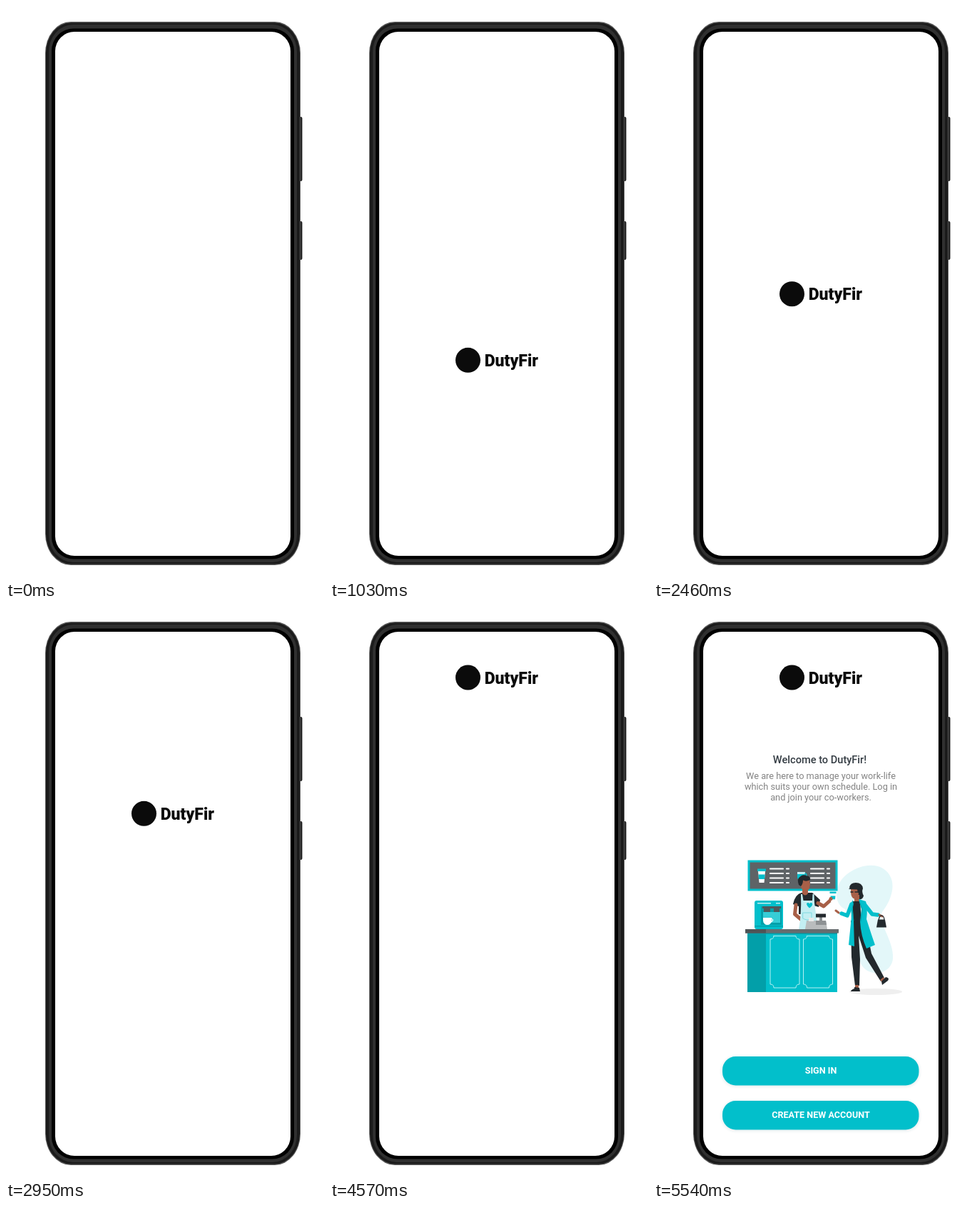
These frames come from a looping animation (446x800 px, 7.74 s). An HTML page:

```html
<!DOCTYPE html>
<html lang="en">
<head>
<meta charset="utf-8">
<title>Phone onboarding</title>
<style>
  html, body { margin: 0; width: 100%; height: 100%; overflow: hidden; background: #fff; }
  svg { display: block; width: 100%; height: 100%; }
  text { font-family: Roboto, Arial, sans-serif; text-anchor: middle; }

  .logo { animation: rise 7740ms infinite; }
  .welcome { animation: appear 7740ms infinite; }

  /* 0 to 1660 ms up to the middle, 2460 to 4460 ms up to the top */
  @keyframes rise {
    0% { transform: translateY(784.5px); animation-timing-function: cubic-bezier(.245, .403, .665, 1); }
    21.447% { transform: translateY(303px); animation-timing-function: linear; }
    31.783% { transform: translateY(303px); animation-timing-function: ease-out; }
    57.623%, 100% { transform: translateY(0); }
  }
  /* 4600 to 5600 ms */
  @keyframes appear {
    0%, 59.432% { opacity: 0; animation-timing-function: ease-out; }
    72.351%, 100% { opacity: 1; }
  }

  .brand { font-size: 23px; font-weight: 900; text-anchor: end; fill: #0b0b0b; }
  .title { font-size: 14.6px; font-weight: 500; fill: #343c43; }
  .body { font-size: 12.75px; fill: #828282; }
  .button rect { fill: #00bfcb; filter: drop-shadow(0 1px 2.5px #0a5a6426); }
  .button text { font-size: 12.6px; font-weight: 700; fill: #fff; }

  .teal { fill: #00bfcb; }
  .deep { fill: #009fa9; }
  .ink { fill: #22282c; }
  .skin { fill: #a85f47; }
  .pale { fill: #c3eef2; }
  .line { fill: none; stroke-linecap: round; stroke-linejoin: round; }
</style>
</head>
<body>
<svg viewBox="0 0 446 800">
  <defs>
    <clipPath id="screen"><rect x="69" y="36" width="330" height="733" rx="27"/></clipPath>
    <path id="menu" class="line" stroke="#fff" stroke-width="2.2"
      d="M163 367.5h18M163 374h18M163 380.5h18M163 387h18M186 367.5h3M186 374h3M186 380.5h3M186 387h3"/>
    <path id="panel" class="line" stroke="#b5f0f3" stroke-width="1"
      d="M168 461.5H199Q199 466 204 466V529Q199 529 199 534H168Q168 529 163 529V466Q168 466 168 461.5Z"/>
    <g id="cup">
      <path fill="#fff" d="M-5-6H5L3.500 10H-3.500Z"/>
      <path class="teal" d="M-6-9.500H6V-6H-6ZM-4.600-1.500H4.600L4 5H-4Z"/>
    </g>
  </defs>

  <!-- phone -->
  <g>
    <rect x="409" y="155" width="6.500" height="90" rx="2" fill="#222"/>
    <rect x="409" y="301" width="6.500" height="54" rx="2" fill="#222"/>
    <rect x="55" y="22" width="358" height="760" rx="36" ry="44" fill="#555"/>
    <rect x="56" y="23.500" width="356" height="757" rx="35" ry="42.500" fill="#1b1b1b"/>
    <rect x="60" y="26" width="348" height="752" rx="34" ry="38" fill="#303030"/>
    <rect x="64" y="31.500" width="340" height="742" rx="31" fill="#000"/>
    <rect x="69" y="36" width="330" height="733" rx="27" fill="#fff"/>
  </g>

  <g clip-path="url(#screen)">
    <g class="logo">
      <circle cx="193.500" cy="100" r="17.500" fill="#0b0b0b"/>
      <text class="brand" x="292" y="108.500">DutyFir</text>
    </g>

    <g class="welcome">
      <text class="title" x="232.500" y="220">Welcome to DutyFir!</text>
      <g class="body">
        <text x="234" y="242">We are here to manage your work-life</text>
        <text x="234" y="257">which suits your own schedule. Log in</text>
        <text x="234" y="271.500">and join your co-workers.</text>
      </g>

      <!-- backdrop -->
      <path fill="#e3f7f9" d="M257 397C260 373 299 354 321 367C343 381 335 409 320 428C313 443 337 468 335 493C333 517 299 520 290 500C283 473 287 433 263 421C256 414 255 405 257 397Z"/>
      <ellipse cx="311" cy="539.500" rx="37" ry="4.500" fill="#efefef"/>

      <!-- menu board -->
      <rect x="133" y="357" width="123" height="40" fill="#5d6265" stroke="#00bfcb" stroke-width="3"/>
      <use href="#cup" x="151" y="377"/>
      <use href="#menu"/>
      <use href="#menu" x="57"/>
      <path class="teal" d="M201 372H212V379Q212 383 208 383H205Q201 383 201 379Z"/>
      <path class="pale" d="M201 372H212V375H201Z"/>
      <path class="line" stroke="#00bfcb" stroke-width="1.500" d="M212 374Q216 376 212 379"/>

      <!-- barista -->
      <path class="ink" d="M207 401L222 401L233 411L231 421L224 419V431H203V420L195 417Q198 403 207 401Z"/>
      <path class="line" stroke="#a85f47" stroke-width="5" d="M199 418L197.500 431L207 439M230 415.500L238 420L248 411"/>
      <path class="skin" d="M208 393H216V402Q212 407 208 402Z"/>
      <path class="skin" d="M205 383Q205 379 211 379Q218 379 218 385L219 389L217.500 396Q213 400 208 396Q205 393 205 383Z"/>
      <path class="ink" d="M203 390Q200 381 205 378.500Q209 374.500 214 377.500Q219 377 219 383Q213 386 209 383.500Q209 389 206 392Z"/>
      <path class="pale" d="M208 403L209.500 412H222L222.500 403H224.500L225 415L230 452H203Q207 432 206 403Z"/>
      <path class="teal" d="M214 416Q216.500 414 218 416.500Q220 414 222 416Q223 419 218 422.500Q214 419 214 416Z"/>
      <path class="line" stroke="#7fd9e0" stroke-width="1" d="M209 429H221V437Q215 441 209 437Z"/>
      <use href="#cup" transform="translate(251 406.500) scale(.75)"/>
      <circle class="skin" cx="248" cy="409.500" r="2.500"/>

      <!-- coffee machine -->
      <rect class="teal" x="141" y="412" width="40" height="40" rx="3"/>
      <path class="deep" d="M150 420H179V446H150Z"/>
      <path fill="#35cdd6" d="M153 428H177V443H153Z"/>
      <path fill="#4e5659" d="M152 420H178V423H176V428H168V423H163V428H154V423H152Z"/>
      <path class="pale" d="M145 415H164V416.500H145ZM171 415H177V416.500H171Z"/>
      <path fill="#fff" d="M153 436H165V440Q164 446 159 446Q154 446 153 440Z"/>
      <path class="line" stroke="#fff" stroke-width="1.300" d="M165 437.500Q169 439 164 442"/>
      <path class="deep" d="M141 447H181V448.500H141Z"/>

      <!-- till -->
      <path fill="#8d9193" d="M232 435H236V442H232Z"/>
      <rect class="ink" x="227" y="430.500" width="14" height="5"/>
      <path fill="#b9bcbd" d="M214 440H241L243 452H212Z"/>
      <path fill="#e8eaea" d="M217 436H224V441H217Z"/>
      <path fill="#8d9193" d="M227 440H241L242 446H227Z"/>

      <!-- counter -->
      <rect class="deep" x="131" y="457" width="26" height="83"/>
      <rect class="teal" x="157" y="457" width="100" height="83"/>
      <rect class="deep" x="157" y="457" width="100" height="2"/>
      <rect x="128" y="452" width="131" height="5.500" fill="#666b6d"/>
      <rect x="128" y="452" width="29" height="5.500" fill="#4e5355"/>
      <use href="#panel"/>
      <use href="#panel" x="46.500"/>

      <!-- customer -->
      <path class="ink" d="M276 440H294Q301 465 305 486L323 520L318 525L297 492L287 461L289 494L288 531H282L277 491Z"/>
      <path class="skin" d="M282 530H287V535H282ZM317 523L322 519L324 523L320 526Z"/>
      <path class="ink" d="M281 533L288 534L289 539H276Q276 537 281 535ZM319 525L325 519Q331 520 328 524L320 530Z"/>
      <path class="ink" d="M274 394Q275 387 283 387Q292 387 293 395Q291 400 294 405Q293 412 285 410L282 396Z"/>
      <path class="skin" d="M281 404H288V414Q284 417 281 413Z"/>
      <path class="skin" d="M276 395Q281 393 286 395L287 402Q286 409.500 281 409.500Q277 409 276 401Z"/>
      <path class="ink" d="M273 396Q278 390 288 393L289 402L286 401L285 396.500Z"/>
      <path class="line" stroke="#22282c" stroke-width="1.500" d="M276 400H279M282 400H286"/>
      <path class="ink" d="M278 413H289L291 442H277Z"/>
      <path class="line" stroke="#00bfcb" stroke-width="5.500" d="M277 417L271 433L263 430M295 417L306 431L314 432"/>
      <path class="teal" d="M279 411L275 418Q278 430 276 444L273 474L281 476L280 440L279 425ZM287 410L297 413Q300 423 298 438Q305 460 310 474L298 479Q290 461 289 441L291 424Z"/>
      <path class="line" stroke="#0097a1" stroke-width=".8" d="M288 413L292 424L290 441M280 414L278 424L280 440"/>
      <path class="line" stroke="#a85f47" stroke-width="3" d="M259 429L255 426M316 432L320 434"/>
      <path class="line" stroke="#22282c" stroke-width="1.300" d="M315 440Q316 432 320 433Q323 434 323 440"/>
      <path class="ink" d="M314 438.500H324L326 449.500H312Z"/>

      <g class="button">
        <rect x="96" y="630" width="275.500" height="40.500" rx="18.500"/>
        <text x="234" y="654.300">SIGN IN</text>
      </g>
      <g class="button">
        <rect x="96" y="692" width="275.500" height="40.500" rx="18.500"/>
        <text x="234" y="716.300">CREATE NEW ACCOUNT</text>
      </g>
    </g>
  </g>
</svg>
</body>
</html>
```
